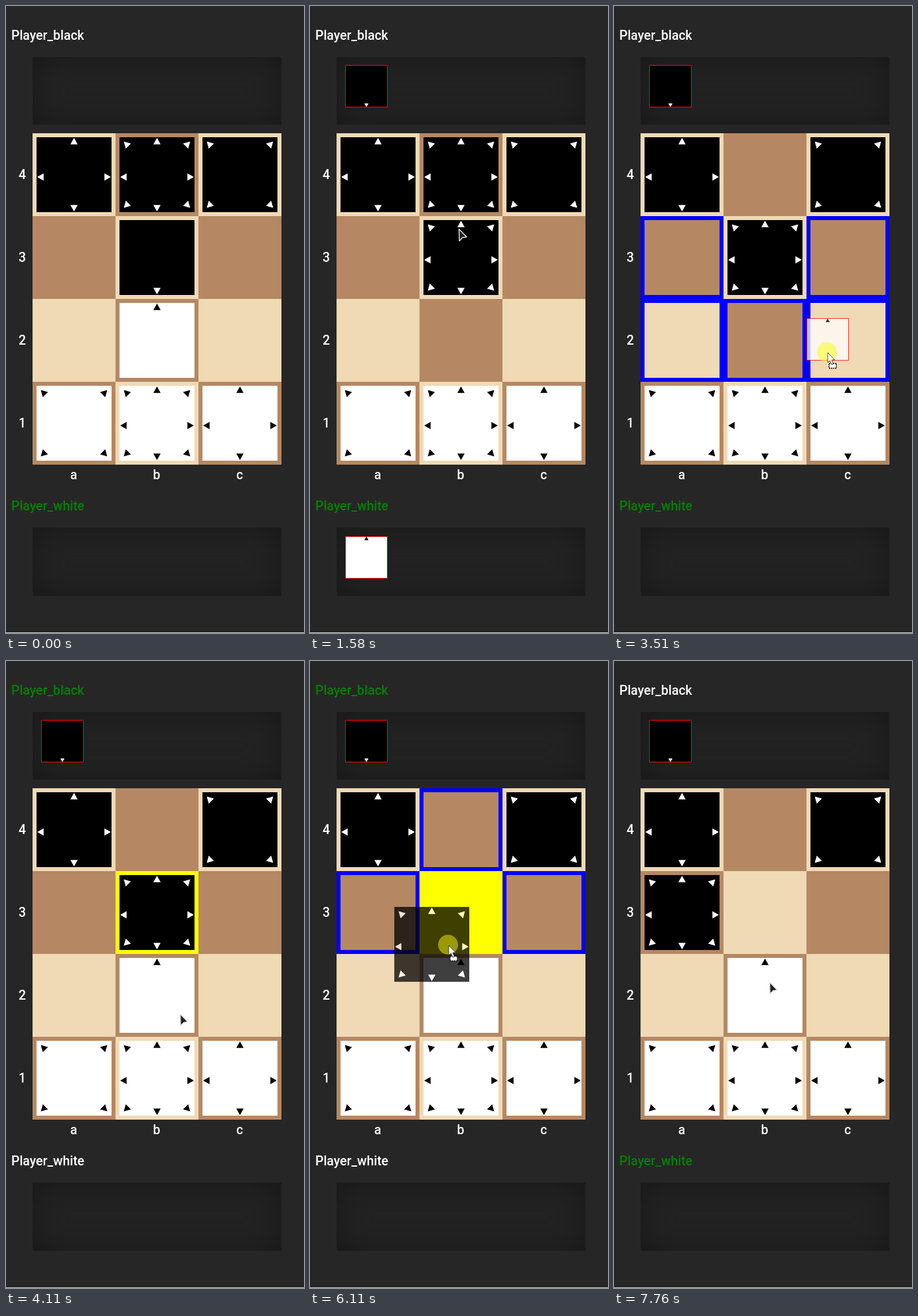
Write an HTML page that moves like this. It is 449 px wide and 946 px high and loops after 8 s.

```html
<!DOCTYPE html>
<html lang="en">
<head>
<meta charset="utf-8">
<title>Board game</title>
<style>
html, body { margin: 0; width: 100%; height: 100%; overflow: hidden; background: #262626; }
svg { position: absolute; left: 0; top: 0; display: block; }
.tray { position: absolute; left: 40px; width: 375px; height: 102px; background: #232323; box-shadow: inset 0 0 50px #181818; }
text { font: 500 19.4px Roboto, sans-serif; fill: #fff; }
.mid { text-anchor: middle; }
</style>
</head>
<body>
<div class="tray" style="top:77px"></div>
<div class="tray" style="top:787px;height:103px"></div>
<svg width="449" height="946" viewBox="0 0 449 946">
  <text id="black" x="8" y="51">Player_black</text>
  <text id="white" x="8" y="761">Player_white</text>
  <g id="marks"></g>
  <g id="board"></g>
  <g id="drag"></g>
  <g id="pointer"></g>
</svg>
<script>
const LOOP = 8000, ENTER = 70;
const CELL = 125, LEFT = 40, TOP = 192, INSET = 6, SIZE = 113, MID = SIZE / 2;
const COLS = [...'abc'], ROWS = [...'4321'];
const POCKET = { x: 53, black: 89, white: 800, size: 64 };
const $ = id => document.getElementById(id);

// Capitals are black: rook, king, bishop, pawn
const START = ['RKB', '.P.', '.p.', 'bkr'];

// clear: when the vacated square is repainted
const MOVES = [
  { from: 'b2', to: 'b3', down: 330, up: 720, clear: 850, hints: 'b3', take: 'white', check: 'b4' },
  { from: 'b4', to: 'b3', down: 1190, up: 1510, clear: 1650, hints: 'a3 b3 c3', take: 'black' },
  { from: 'pocket', to: 'b2', down: 2630, up: 3980, clear: 3980, hints: 'a3 c3 a2 b2 c2', check: 'b3' },
  { from: 'b3', to: 'a3', down: 5630, up: 7370, clear: 7370, hints: 'b4 a3 c3' }
];

function corner(square) {
  return [LEFT + COLS.indexOf(square[0]) * CELL, TOP + ROWS.indexOf(square[1]) * CELL];
}
const centre = square => corner(square).map(v => v + CELL / 2);

// Pointer strokes: begin, end, target, sideways bend
const STROKES = [
  [ENTER, 330, centre('b2')],
  [330, 690, [226, 386]],
  [920, 1190, centre('b4')],
  [1190, 1510, [224, 336]],
  [1640, 1710, [236, 392]],
  [1780, 2570, [85, 852]],
  [2630, 3370, [322, 523], 50],
  [3570, 3710, [262, 532]],
  [4640, 4890, [258, 428], 85],
  [5090, 5430, [253, 381]],
  [5630, 6110, [209, 429]],
  [6170, 6630, [144, 405], 20],
  [6830, 7040, [127, 394]],
  [7570, 7760, [234, 484]]
];

function pointerAt(t) {
  let x = 390, y = 920;
  for (const [begin, end, [tx, ty], bend = 0] of STROKES) {
    if (t <= begin) break;
    const k = Math.min(1, (t - begin) / (end - begin)), ease = k * k * (3 - 2 * k);
    const dx = tx - x, dy = ty - y, side = bend * Math.sin(Math.PI * ease) / Math.hypot(dx, dy);
    x += dx * ease + dy * side;
    y += dy * ease - dx * side;
    if (k < 1) break;
  }
  return [Math.round(x), Math.round(y)];
}

const rect = (x, y, w, h, fill, extra = '') =>
  `<rect x="${x}" y="${y}" width="${w}" height="${h}" fill="${fill}" ${extra}/>`;

// dir counts eighths of a turn clockwise from up
function arrow(dir) {
  const a = dir * Math.PI / 4;
  const dx = Math.sign(Math.round(Math.sin(a) * 2)), dy = -Math.sign(Math.round(Math.cos(a) * 2));
  const reach = dx && dy ? 50 : 55.5;
  const x = MID + dx * reach, y = MID + dy * reach + (dy ? 0 : 3.5);
  return `<path d="M0 0L5.5 9.7H-5.5Z" transform="translate(${x} ${y}) rotate(${dir * 45})"/>`;
}

const isWhite = code => code === code.toLowerCase();

function moves(code, dir) {
  switch (code.toLowerCase()) {
    case 'k': return true;
    case 'r': return dir % 2 === 0;
    case 'b': return dir % 2 === 1;
    default: return dir === (isWhite(code) ? 0 : 4);
  }
}

function piece(code, x, y) {
  const [body, ink] = isWhite(code) ? ['#fff', '#000'] : ['#000', '#fff'];
  let out = rect(0, 0, SIZE, SIZE, body);
  for (let dir = 0; dir < 8; dir++) if (moves(code, dir)) out += arrow(dir);
  return `<g transform="translate(${x} ${y})" fill="${ink}">${out}</g>`;
}

function smallPiece(code, x, y) {
  const n = POCKET.size;
  return `<g transform="translate(${x} ${y}) scale(${n / SIZE})">${piece(code, 0, 0)}</g>` +
    rect(x + .5, y + .5, n - 1, n - 1, 'none', 'stroke="#f00"');
}

function stateAt(t) {
  const s = { squares: {}, pocket: {}, turn: 'white', check: '', held: null };
  START.forEach((line, r) => [...line].forEach((code, c) => {
    if (code !== '.') s.squares[COLS[c] + ROWS[r]] = code;
  }));
  for (const m of MOVES) {
    if (t < m.down) break;
    const drop = m.from === 'pocket', code = drop ? 'p' : s.squares[m.from];
    if (drop) s.pocket.white = false;
    if (t < m.up) {
      delete s.squares[m.from];
      s.held = { ...m, code, drop };
      break;
    }
    if (t >= m.clear) delete s.squares[m.from];
    s.squares[m.to] = code;
    if (m.take) s.pocket[m.take] = true;
    s.turn = s.turn === 'white' ? 'black' : 'white';
    s.check = m.check || '';
  }
  return s;
}

function drawBoard(s) {
  const hints = s.held ? s.held.hints.split(' ') : [];
  let out = '';
  ROWS.forEach((row, r) => COLS.forEach((col, c) => {
    const id = col + row, [x, y] = corner(id);
    // The bottom-left corner colour alternates across the board
    const plain = (r + c) % 2 ? '#b58863' : '#f0d9b5';
    out += rect(x, y, CELL, CELL, id === s.check ? '#ff0' : plain);
    if (s.squares[id]) out += piece(s.squares[id], x + INSET, y + INSET);
    if (hints.includes(id))
      out += rect(x + 3, y + 3, CELL - 6, CELL - 6, 'none', 'stroke="#00f" stroke-width="6"');
  }));
  if (s.pocket.black) out += smallPiece('P', POCKET.x, POCKET.black);
  if (s.pocket.white) out += smallPiece('p', POCKET.x, POCKET.white);
  return out;
}

function drawHeld(held, x, y) {
  if (!held) return '';
  const home = held.drop ? [POCKET.x, POCKET.white] : corner(held.from).map(v => v + INSET);
  const grab = pointerAt(held.down);
  const draw = held.drop ? smallPiece : piece;
  return `<g opacity=".75">${draw(held.code, home[0] + x - grab[0], home[1] + y - grab[1])}</g>` +
    `<circle cx="${x - 1}" cy="${y - 1}" r="15" fill="#ff0" opacity=".48"/>`;
}

function drawPointer(held, x, y) {
  const shape = held
    ? rect(2, 16.5, 11, 7, '#fff', 'stroke="#000" stroke-width="1.4" stroke-dasharray="2 1"') +
      '<path d="M0 0V15L3.5 12L6 18L8.5 17L6 11H10.5Z" fill="#fff" stroke="#222" stroke-width=".8"/>'
    : '<path d="M.5 .5L12 12.5L5.8 13.5L1 18.5Z" fill="#222" stroke="#e4e4e4" stroke-width="1.4" stroke-linejoin="round"/>';
  return `<g transform="translate(${x} ${y})">${shape}</g>`;
}

const label = (text, x, y) => `<text class="mid" x="${x}" y="${y}">${text}</text>`;
$('marks').innerHTML = rect(0, 945, 449, 1, '#ccc') +
  ROWS.map((c, i) => label(c, 24.5, 261 + i * CELL)).join('') +
  COLS.map((c, i) => label(c, 102 + i * CELL, 714)).join('');

let shown = '';
function draw(t) {
  const s = stateAt(t), [x, y] = pointerAt(t);
  const board = drawBoard(s);
  if (board !== shown) $('board').innerHTML = shown = board;
  for (const side of ['black', 'white']) $(side).style.fill = s.turn === side ? '#008000' : '#fff';
  $('drag').innerHTML = drawHeld(s.held, x, y);
  $('pointer').innerHTML = t < ENTER ? '' : drawPointer(s.held, x, y);
}

const begin = performance.now();
function tick() {
  draw((performance.now() - begin) % LOOP);
  requestAnimationFrame(tick);
}
tick();
</script>
</body>
</html>
```
